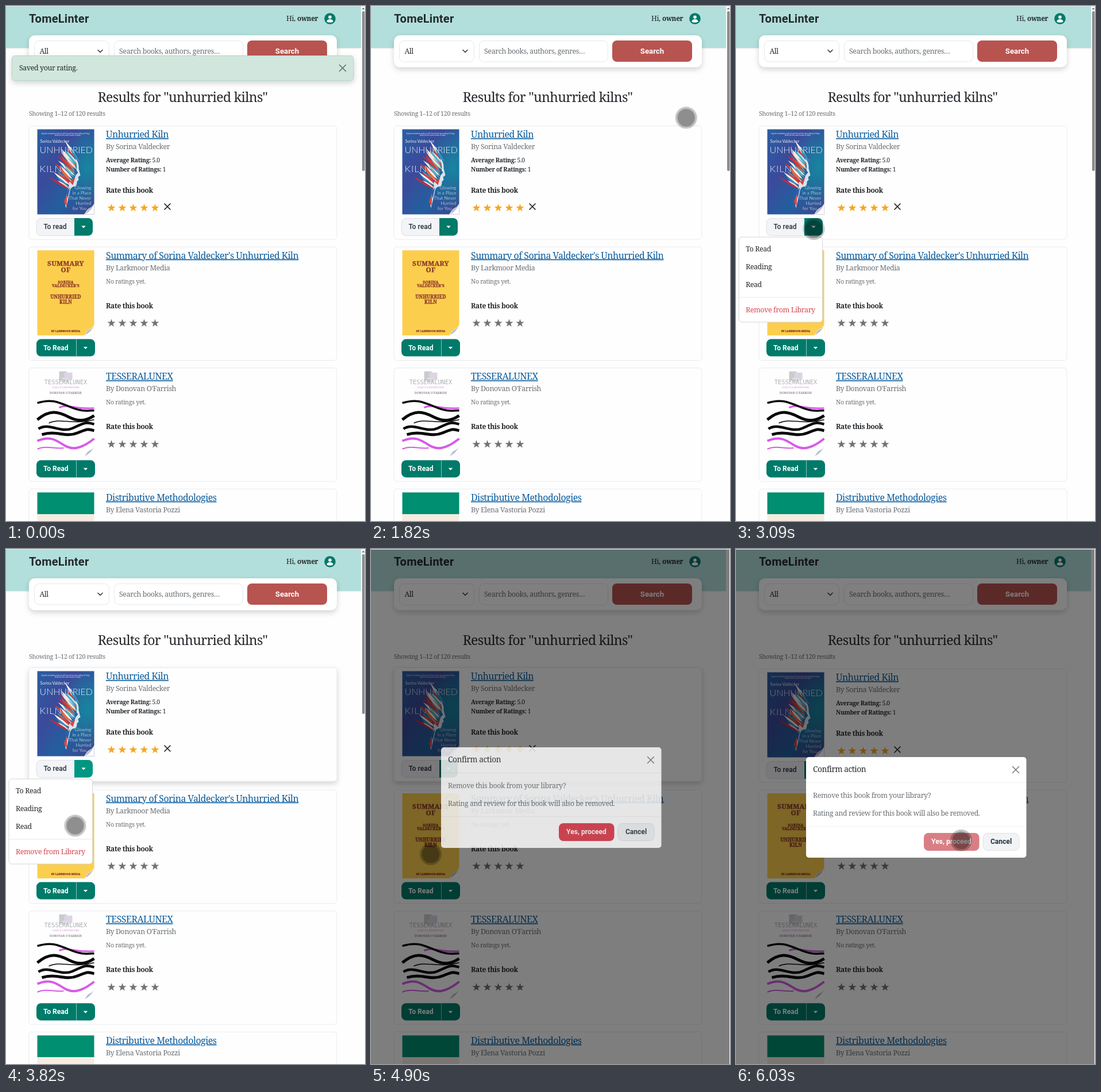
Write an HTML page that moves like this. It is 625 px wide and 896 px high and loops after 8000 ms.

```html
<!DOCTYPE html>
<html lang="en">
<head>
<meta charset="utf-8">
<title>Book search</title>
<style>
  html, body { margin: 0; width: 100%; height: 100%; overflow: hidden; background: #fefefe; }
  svg { display: block; width: 625px; height: 896px; }
  text { font: 12.4px 'Noto Serif', serif; letter-spacing: -.03em; fill: #24282c; white-space: pre; }
  .ui { font: 600 12.1px Roboto, sans-serif; letter-spacing: 0; }
  .brand { font: 700 20px Roboto, sans-serif; letter-spacing: .25px; }
  .h1 { font-size: 23.1px; }
  .title { font-size: 15.9px; fill: #075a9c; text-decoration: underline; text-decoration-thickness: 1px; text-underline-offset: 2px; }
  .muted { fill: #6a6f74; }
  .small { font-size: 10.75px; }
  .meta { font-size: 10.4px; }
  .bold { font-weight: 700; }
  .rate { font-size: 12px; font-weight: 700; }
  .mid { text-anchor: middle; }
  .end { text-anchor: end; }
  .white { fill: #fff; }
  .line { fill: none; stroke: #e6e8eb; }
  .x { fill: none; stroke-width: 1.5; stroke-linecap: round; }
  .float { filter: drop-shadow(0 4px 5px rgba(0,0,0,.17)); }
  .lato { font-family: Lato, sans-serif; letter-spacing: 0; fill: #e4f0f6; }
  .slab { font-weight: 900; fill: #8d3a2a; stroke: #8d3a2a; stroke-width: .3; letter-spacing: .02em; text-anchor: middle; }
</style>
</head>
<body>
<svg id="stage" viewBox="0 0 625 896"></svg>
<script>
const LOOP = 8000;
const TEAL = '#007a69';

const text = (x, y, cls, str, attrs = '') => `<text x="${x}" y="${y}" class="${cls}" ${attrs}>${str}</text>`;
const rect = (x, y, w, h, fill, rx = 0, attrs = '') =>
  `<rect x="${x}" y="${y}" width="${w}" height="${h}" rx="${rx}" fill="${fill}" ${attrs}/>`;
const path = (d, attrs) => `<path d="${d}" ${attrs}/>`;
const group = (id, body, attrs = '') => `<g id="${id}" ${attrs}>${body}</g>`;
const cross = (x, y, r, color) =>
  path(`M${x - r} ${y - r}l${2 * r} ${2 * r}m0 ${-2 * r}l${-2 * r} ${2 * r}`, `class="x" stroke="${color}"`);
const caret = (x, y) => path(`M${x - 3.7} ${y - 2}h7.4l-3.7 4z`, 'fill="#fff"');
const sized = px => `style="font-size:${px}px"`;

function seeded(seed) {
  return () => (seed = seed * 16807 % 2147483647) / 2147483647;
}

function star(cx, cy, fill) {
  const points = Array.from({ length: 10 }, (_, i) => {
    const r = i % 2 ? 2.9 : 7.4, a = (i / 5 - .5) * Math.PI;
    return `${(cx + r * Math.cos(a)).toFixed(1)},${(cy + r * Math.sin(a)).toFixed(1)}`;
  });
  return `<polygon points="${points.join(' ')}" fill="${fill}"/>`;
}

const curl = path('M82 148Q92 145 99 130V148z', 'fill="#fff"') +
  path('M82 148Q88 138 90 138Q96 136 99 130Q95 142 82 148z', 'fill="#b9bdcc" stroke="#f4f4f8" stroke-width=".8"');

// Feathers sweep up and left from the line of the profile.
function feathers() {
  const rand = seeded(41);
  const colors = ['#d93d35', '#f4f2ee', '#2a8fc4', '#e86a3a', '#e9e4e0', '#b92e4b', '#45b5c9'];
  return Array.from({ length: 34 }, (_, i) => {
    const down = i / 33, deg = 222 - 14 * down + rand() * 16, len = 22 + rand() * 22;
    const x = 73 - 17 * down + rand() * 4 - 4 * rand(), y = 54 + 50 * down;
    return path(`M0 0Q${len / 2} -5 ${len} 0Q${len / 2} 3 0 0z`,
      `transform="translate(${x.toFixed(1)} ${y.toFixed(1)}) rotate(${deg.toFixed(1)})" fill="${colors[i % 7]}"`);
  }).join('');
}

const covers = [
  () => rect(0, 0, 99, 148, 'url(#night)') + rect(0, 0, 99, 148, 'url(#glow)') +
    text(49, 8, 'lato mid', 'A gentle and patient study of craft, fire and the slow making of things', sized(2.8)) +
    text(53, 11.5, 'lato mid', 'Notes for the careful reader of today', sized(2.8)) +
    text(5, 23, 'lato', 'Sorina Valdecker', sized(7)) +
    feathers() +
    path('M66 50Q73 58 72 68L75 80L71 83L72 88L69 91Q70 100 62 100Q57 102 56 112L50 137Q46 126 51 114Q56 100 55 92Q64 90 67 80Q71 66 66 50z', 'fill="#edf1f4" opacity=".9"') +
    path('M46 126L52 112L51 134zM57 92L66 84L62 97z', 'fill="#d64743"') +
    path('M50 110L57 101L53 120zM66 69L71 75L67 80z', 'fill="#315fa8"') +
    text(4, 41, 'lato', 'UNHURRIED', 'style="font-size:16px;font-weight:300"') +
    text(4, 74, 'lato', 'KILN', 'style="font-size:16.5px;font-weight:300;letter-spacing:1px"') +
    ['Glowing', 'in a Place', 'That Never', 'Hurried', 'for You'].map((s, i) =>
      text(i < 4 ? 94 : 86, 104.5 + i * 9, 'lato end', s, 'style="font-size:8px;opacity:.65"')).join(''),

  () => rect(0, 0, 99, 148, '#fcce4d') +
    [['SUMMARY', 27, 11.6], ['OF', 37.5, 11.6], ['SORINA', 57.5, 6.6], ['VALDECKER\'S', 64, 6.6],
     ['UNHURRIED', 84, 8.2], ['KILN', 92.5, 8.2], ['BY LARKMOOR MEDIA', 142, 4.3]]
      .map(([s, y, px]) => text(49.5, y, 'slab', s, sized(px))).join(''),

  () => rect(0, 0, 99, 148, '#fefefe') +
    rect(38, 0, 13, 16, '#c9cbce') + rect(47, 2, 14, 13, '#ddd4e2') + rect(43, 11, 12, 7, '#dcdee0') +
    text(49.5, 22, 'mid', 'TESSERALUNEX', `style="font:10.3px 'DejaVu Sans Mono',monospace;letter-spacing:0;fill:#aeb1b4"`) +
    text(49.5, 29.5, 'mid', 'A TALE OF A DIFFERENT KIND', 'style="font-size:3.2px;fill:#d58bdc;letter-spacing:0"') +
    text(49.5, 39, 'mid', 'DONOVAN O\'FARRISH', 'style="font-size:5px;fill:#555;letter-spacing:.2px"') +
    [['M38 63C55 55 62 67 99 64', 3, '#d65be6'], ['M0 121C22 112 32 119 46 128S75 136 99 117', 4, '#d65be6'],
     ['M0 135C18 128 30 136 46 133', 2, '#d65be6'], ['M0 55C23 48 34 52 55 61S84 69 99 68', 3.5, '#080808'],
     ['M0 84C22 66 36 70 54 79S84 87 99 77', 5, '#080808'], ['M2 100C20 88 40 108 61 99S82 87 99 92', 4.5, '#080808'],
     ['M8 110C35 102 48 116 70 107S88 101 99 103', 5, '#080808'], ['M20 90C40 80 60 94 99 84', 1.5, '#080808']]
      .map(([d, w, c]) => path(d, `fill="none" stroke="${c}" stroke-width="${w}"`)).join(''),

  () => rect(0, 0, 99, 38, '#008f70') + rect(0, 38, 99, 110, '#f6ece1')
];

const books = [
  { title: 'Unhurried Kiln', author: 'Sorina Valdecker', saved: true },
  { title: 'Summary of Sorina Valdecker\'s Unhurried Kiln', author: 'Larkmoor Media' },
  { title: 'TESSERALUNEX', author: 'Donovan O\'Farrish' },
  { title: 'Distributive Methodologies', author: 'Elena Vastoria Pozzi' }
];

function shelfButton(saved) {
  if (!saved) return rect(53, 161, 102, 30, TEAL, 8) + rect(122, 161, 1, 30, '#8fc4bc') +
    text(65, 180, 'ui white', 'To Read') + caret(138.5, 176.5);
  return rect(53, 161.5, 97, 30, '#f3f4f7', 8, 'stroke="#dcdfe4"') +
    path('M119 161h24a8 8 0 0 1 8 8v14.5a8 8 0 0 1-8 8h-24z', `id="toggle" fill="${TEAL}"`) +
    text(65.5, 180, 'ui', 'To read', 'style="fill:#25313d;font-weight:500"') + caret(135, 176.5);
}

const menu = rect(5, 194, 145.5, 148, '#fff', 5, 'stroke="#d3d5d8"') +
  ['To Read', 'Reading', 'Read'].map((s, i) => text(17, 219 + i * 31, '', s)).join('') +
  path('M5 299h145', 'class="line"') +
  text(17, 325, '', 'Remove from Library', 'style="fill:#d94450"');

function card(book, i) {
  const { title, author, saved } = book;
  const rateY = saved ? 117 : 107;
  const frame = rect(40, .5, 536, 197.5, '#fefefe', 5, 'stroke="#e9ebee"');
  const info = saved
    ? text(174, 64, 'meta', '<tspan class="bold">Average Rating:</tspan> 5.0') +
      text(174, 80, 'meta', '<tspan class="bold">Number of Ratings:</tspan> 1') + cross(281, 141, 5, '#111')
    : text(174, 64, 'small muted', 'No ratings yet.');
  const stars = [0, 1, 2, 3, 4].map(n => star(183.5 + n * 19, rateY + 26.3, saved ? '#f5a623' : '#707376')).join('');
  const body = (saved ? group('raised', frame, 'class="float"') : '') + frame +
    `<g transform="translate(54.5 6.5)">${covers[i]()}${i < 3 ? curl : ''}</g>` +
    text(174, 21, 'title', title) + text(174, 41, 'muted', 'By ' + author) + info +
    text(174, rateY, 'rate', 'Rate this book') + stars + shelfButton(saved) + (saved ? group('menu', menu) : '');
  return `<g transform="translate(0 ${208 + i * 210.6})">${group('card' + i, body)}</g>`;
}

const header = rect(0, 1, 618, 72, '#b2dfdb', 0, 'style="filter:drop-shadow(0 1px 1px rgba(0,0,0,.1))"') +
  rect(0, 0, 625, 1, '#e4e8e8') +
  text(40, 28.5, 'brand', 'TomeLinter') +
  text(488, 26, '', 'Hi,') + text(507, 26, 'bold', 'owner', sized(11.8)) +
  `<circle cx="564" cy="22" r="9.8" fill="#00796b"/><circle cx="564" cy="19.3" r="2.8" fill="#fff"/>` +
  path('M558.5 27.5q0-4.5 5.5-4.5t5.5 4.5q-5.5 2.6-11 0z', 'fill="#fff"') +
  rect(40, 51, 536, 55.5, '#fff', 10, 'class="float"') +
  rect(49.5, 60.5, 130, 36.5, '#fff', 8, 'class="line"') + text(58.5, 83, '', 'All') +
  path('M160 76.5l4 4 4-4', 'class="x" stroke="#333"') +
  rect(188.5, 60.5, 224, 36.5, '#fff', 8, 'class="line"') + text(197, 83, 'muted', 'Search books, authors, genres…') +
  rect(420, 60, 139, 37, '#b85450', 8) + text(489.5, 83, 'ui white mid', 'Search', sized(13.2));

const toast = rect(10.5, 86.5, 594.5, 43, '#d1e7dd', 5, 'stroke="#b4d8c6" class="float"') +
  text(23, 112, '', 'Saved your rating.') + cross(586, 108, 5.5, '#5c6a64');

const modal = rect(122, 362, 383.5, 175, '#fff', 5) +
  text(134, 388, '', 'Confirm action', 'style="font-size:13.7px"') + cross(487, 384, 5.5, '#777') +
  path('M122 406.5h383M122 482.5h383', 'class="line" opacity=".6"') +
  text(134, 433, 'muted', 'Remove this book from your library?') +
  text(134, 464, 'muted', 'Rating and review for this book will also be removed.', sized(12.2)) +
  rect(327, 494, 96.5, 31, '#dc3545', 8, 'id="proceed"') + text(375, 513, 'ui white mid', 'Yes, proceed') +
  rect(430, 494.5, 63, 30, '#f1f3f5', 8, 'stroke="#dfe2e6"') + text(461.5, 513, 'ui mid', 'Cancel', 'style="fill:#25313d"');

document.getElementById('stage').innerHTML = `<defs>
  <linearGradient id="night" x1="0" y1="0" x2="1" y2="1">
    <stop offset="0" stop-color="#2a5fa2"/><stop offset=".35" stop-color="#3b4a9b"/>
    <stop offset=".65" stop-color="#235f9f"/><stop offset="1" stop-color="#40448c"/></linearGradient>
  <radialGradient id="glow" cx=".9" cy=".45" r=".5">
    <stop offset="0" stop-color="#1492a0" stop-opacity=".75"/><stop offset="1" stop-color="#1492a0" stop-opacity="0"/></radialGradient></defs>` +
  rect(0, 0, 625, 896, '#fefefe') + header +
  text(307.5, 167, 'h1 mid', 'Results for "unhurried kilns"') +
  text(40, 191, 'small muted', 'Showing 1–12 of 120 results') +
  books.map(card).reverse().join('') +
  group('scroll', rect(620, 9, 4.5, 278, '#8b8b8b', 2) + path('M619.5 6l2.5-3.5 2.5 3.5z', 'fill="#777"')) +
  group('toast', toast) +
  group('shade', rect(0, 1, 624, 895, '#000')) +
  group('modal', modal) +
  group('pointer', '<circle r="15.4" fill="#000" fill-opacity=".44"/><circle r="17.2" fill="none" stroke="#000" stroke-opacity=".23" stroke-width="3.5"/>');

// Each step is [ms, value, easing to the next step]; two steps at one time make a hard change.
function play(id, prop, steps) {
  const all = [[0, steps[0][1]], ...steps, [LOOP, steps[steps.length - 1][1]]];
  document.getElementById(id).animate(
    all.map(([ms, value, easing = 'linear']) => ({ offset: ms / LOOP, [prop]: value, easing })),
    { duration: LOOP, iterations: Infinity });
}
const toggleAt = (id, start, ...times) =>
  play(id, 'opacity', times.flatMap((ms, i) => [[ms, (start + i) % 2], [ms, (start + i + 1) % 2]]));
const at = (x, y) => `translate(${x}px, ${y}px)`;

play('toast', 'opacity', [[1490, 1], [1640, 0]]);
toggleAt('menu', 0, 3085, 4550);
toggleAt('scroll', 1, 4550);
play('card0', 'transform', [[3110, at(0, 0), 'ease'], [3350, at(0, -2)], [5380, at(0, -2), 'ease'], [5580, at(0, 0)]]);
play('raised', 'opacity', [[3110, 0], [3350, 1], [5380, 1], [5580, 0]]);
play('toggle', 'fill', [[3110, TEAL], [3350, '#009682'], [4550, '#009682'], [4650, TEAL]]);
play('shade', 'opacity', [[4612, 0], [4765, .5]]);
play('modal', 'opacity', [[4770, 0], [4932, 1]]);
play('modal', 'transform', [[4770, at(0, -44), 'ease-out'], [5070, at(0, 0)]]);
play('proceed', 'fill', [[5880, '#dc3545'], [6020, '#d97e85']]);
toggleAt('pointer', 0, 655, 2550, 2695);
play('pointer', 'transform', [
  [660, at(571, 736), 'ease-in-out'], [1400, at(583, 108)],
  [1640, at(583, 108), 'ease-in'], [1820, at(549, 194)], [1960, at(503, 238)], [2110, at(350, 308)],
  [2290, at(202, 385), 'ease-out'], [2550, at(167, 393)],
  [2690, at(167, 393)], [2690, at(135.5, 388)],
  [3610, at(135.5, 388)], [3680, at(132, 410)], [3820, at(120.5, 481)], [3950, at(109, 519), 'ease-out'], [4080, at(104, 531)],
  [5330, at(104, 531), 'ease-in-out'], [6020, at(392, 507)]
]);
</script>
</body>
</html>
```
